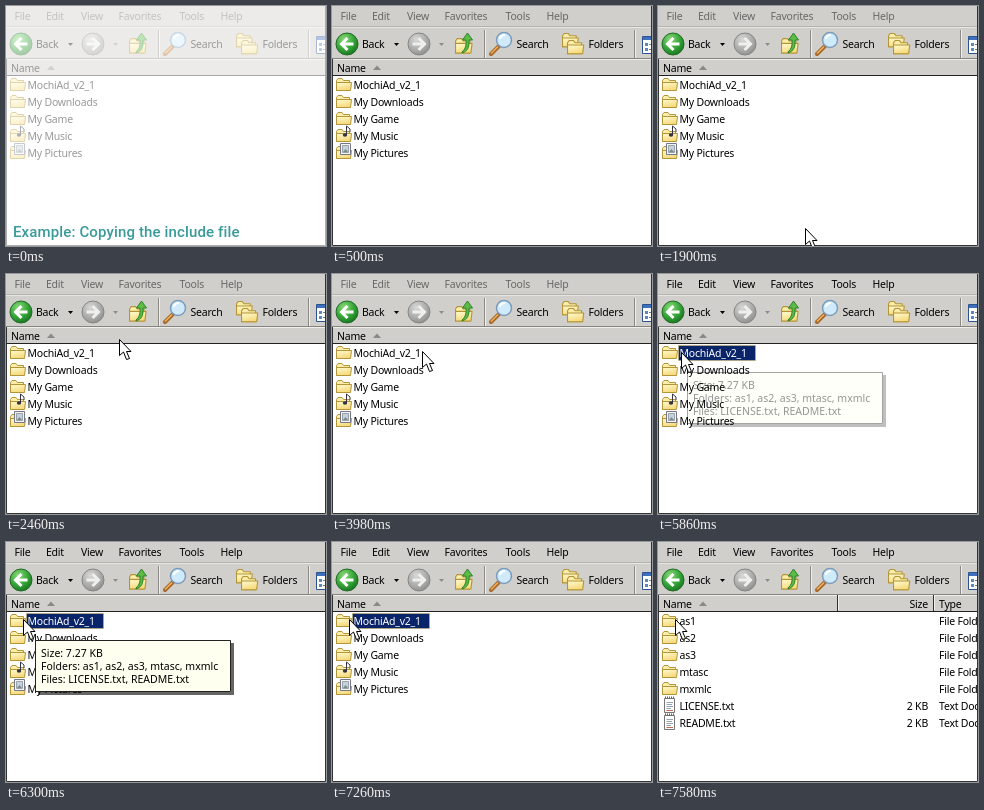
These frames come from a looping animation (320x240 px, 8 s). An HTML page:

```html
<!DOCTYPE html>
<html lang="en">
<head>
<meta charset="utf-8">
<title>File window</title>
<style>
html, body { margin: 0; width: 100%; height: 100%; overflow: hidden; background: #fff; }
svg { display: block; width: 320px; height: 240px; }
text { font: 10.5px "Noto Sans", "DejaVu Sans", sans-serif; letter-spacing: -.22px; white-space: pre; }
#tip text { letter-spacing: 0; }
#caption { font: 500 15px Roboto, sans-serif; letter-spacing: .13px; fill: #399a9a; }
.end { text-anchor: end; }
</style>
</head>
<body>
<svg viewBox="0 0 320 240">
  <defs>
    <linearGradient id="gold" x2=".4" y2="1">
      <stop stop-color="#fffbd2"/><stop offset="1" stop-color="#f6da7c"/>
    </linearGradient>
    <radialGradient id="green" cx=".38" cy=".3" r=".75">
      <stop stop-color="#8edb7c"/><stop offset=".55" stop-color="#38a83a"/><stop offset="1" stop-color="#17731f"/>
    </radialGradient>
    <radialGradient id="grey" cx=".38" cy=".3" r=".75">
      <stop stop-color="#d8d8d6"/><stop offset="1" stop-color="#8f8f8d"/>
    </radialGradient>
    <g id="folder" stroke="#b39437" stroke-linejoin="round">
      <path d="M.5 12.5V2.5L2 .5H6L7.5 2.5H13.5V12.5Z" fill="#fbeeaa"/>
      <path d="M.5 12.5V4.5H15.5L14.5 12.5Z" fill="url(#gold)"/>
    </g>
    <g id="music">
      <use href="#folder"/>
      <path d="M10.5 6V-3L14 0V3" fill="none" stroke="#334"/>
      <ellipse cx="9" cy="6" rx="2.2" ry="1.7" fill="#334"/>
    </g>
    <g id="pictures">
      <use href="#folder"/>
      <path d="M4.5-2.5H14.5V8.5H4.5Z" fill="#f4f4f0" stroke="#778"/>
      <path d="M6.5-.5H12.5V6.5H6.5Z" fill="#c4d2de" stroke="#98a2aa"/>
      <path d="M7 6L9.5 3 12 6Z" fill="#7d8a88"/>
    </g>
    <g id="note">
      <path d="M2.5-.5H12.5V13.5H2.5Z" fill="#fff" stroke="#777"/>
      <path d="M3-1.5H13" stroke="#456a9a" stroke-width="2" stroke-dasharray="1 1"/>
      <path d="M4.5 3.5H11M4.5 5.5H10M4.5 7.5H11M4.5 9.5H9" stroke="#96a4b4"/>
      <path d="M4.5 11.5H11" stroke="#c06a50"/>
    </g>
  </defs>

  <rect width="320" height="240" fill="#fff"/>
  <rect width="320" height="53" fill="#d0cfcb"/>
  <path d="M0 20.5H320" stroke="#b4b3ae"/><path d="M0 21.5H320" stroke="#e6e5e1"/>
  <g id="menu"></g>

  <g id="toolbar">
    <circle cx="15" cy="38" r="11" fill="url(#green)" stroke="#226b28"/>
    <path d="M21.5 38H10M15.5 32L9.5 38 15.5 44" fill="none" stroke="#fff" stroke-width="3"/>
    <path d="M62 37H67L64.5 40Z"/>
    <circle cx="87" cy="38" r="11" fill="url(#grey)" stroke="#858583"/>
    <path d="M80.5 38H92M86.5 32L92.5 38 86.5 44" fill="none" stroke="#efefed" stroke-width="3"/>
    <path d="M107 37H112L109.5 40Z" fill="#8c8c8a"/>
    <use href="#folder" transform="translate(123 32) scale(1.1 1.2)"/>
    <path d="M130 46Q135 42 134 34H130.5L135.5 27 140.5 34H137Q138 45 130 47Z" fill="#5dbb46" stroke="#2a8428"/>
    <path d="M152.5 24V52M302.5 24V52" stroke="#8a8985"/>
    <path d="M153.5 24V52M303.5 24V52" stroke="#f1f0ec"/>
    <path d="M159 48L167 40" stroke="#a8682a" stroke-width="4" stroke-linecap="round"/>
    <path d="M159 47.5L166 40.5" stroke="#eeb45e" stroke-width="1.5"/>
    <circle cx="172" cy="34" r="7.5" fill="#cfeafa" stroke="#7c9cbc" stroke-width="1.5"/>
    <path d="M167.5 33Q169 29 173 29" fill="none" stroke="#fff" stroke-width="2"/>
    <use href="#folder" transform="translate(230 27) scale(1.05 1.1)"/>
    <use href="#folder" transform="translate(235 34) scale(1.08 1.1)"/>
    <path d="M310.5 30.5H321V47.5H310.5Z" fill="#fff" stroke="#2d5290"/>
    <path d="M311 31H320V34H311Z" fill="#3f70bd"/>
    <path d="M313 37H316V40H313ZM313 42H316V45H313Z" fill="#5c88bd"/>
    <path d="M317 38.5H320M317 43.5H320" stroke="#777"/>
  </g>

  <g id="header">
    <rect y="53" width="320" height="16" fill="#d0cfcb"/>
    <path d="M0 52.5H320" stroke="#85847f"/><path d="M0 53.5H320" stroke="#efeeea"/>
    <path d="M0 69.5H320" stroke="#222"/>
    <path d="M41 64H49L45 59.5Z" fill="#8a8985"/>
  </g>
  <g id="columns">
    <path d="M179.5 53V69M275.5 53V69" stroke="#333"/>
    <path d="M180.5 54V68M276.5 54V68" stroke="#f1f0ec"/>
  </g>

  <rect id="selection" x="20.5" y="71.5" width="77" height="15" fill="#0a246a" stroke="#d8b85c" stroke-dasharray="1 1"/>
  <g id="home"></g>
  <g id="inside"></g>
  <rect id="blank" x="1" y="49" width="318" height="190" fill="#fff"/>
  <path d="M.5 53V239.5H319.5V0" fill="none" stroke="#333"/>

  <g id="tip">
    <path d="M225 101H228V153H32V150H225Z" opacity=".6"/>
    <path d="M29.5 98.5H224.5V149.5H29.5Z" fill="#fffff0" stroke="#222"/>
  </g>
  <path id="cursor" d="M.5.5V16.5L4.5 13 7.5 20.5 10.5 19.5 7.5 12.5H12Z" fill="#fff" stroke="#000"/>
  <g id="intro">
    <rect width="320" height="240" fill="#fff" opacity=".6"/>
    <text id="caption" x="7" y="231">Example: Copying the include file</text>
  </g>
</svg>
<script>
const LOOP = 8000, INTRO_END = 500, SELECT = 4220, OPEN = 7420, FILLED = 7580;
const $ = id => document.getElementById(id);

function add(parent, tag, attrs, content = "") {
  const el = document.createElementNS("http://www.w3.org/2000/svg", tag);
  for (const key in attrs) el.setAttribute(key, attrs[key]);
  el.textContent = content;
  return $(parent).appendChild(el);
}
const label = (parent, x, y, content, cls = "") => add(parent, "text", { x, y, class: cls }, content);

function row(parent, i, name, icon = "folder") {
  add(parent, "use", { href: "#" + icon, x: 4, y: 72 + 17 * i });
  return label(parent, 21.5, 83 + 17 * i, name);
}

[["File", 8.5], ["Edit", 40], ["View", 75], ["Favorites", 112.5], ["Tools", 173.5], ["Help", 214.5]]
  .forEach(([name, x]) => label("menu", x, 14, name));
[["Back", 30], ["Search", 184.5], ["Folders", 256.5]].forEach(([name, x]) => label("toolbar", x, 42, name));
label("header", 5, 66, "Name");
label("columns", 270, 66, "Size", "end");
label("columns", 281, 66, "Type");

const chosen = row("home", 0, "MochiAd_v2_1");
["My Downloads", "My Game"].forEach((name, i) => row("home", i + 1, name));
row("home", 3, "My Music", "music");
row("home", 4, "My Pictures", "pictures");

["as1", "as2", "as3", "mtasc", "mxmlc", "LICENSE.txt", "README.txt"].forEach((name, i) => {
  const isFile = i > 4, y = 83 + 17 * i;
  row("inside", i, name, isFile ? "note" : "folder");
  if (isFile) label("inside", 270, y, "2 KB", "end");
  label("inside", 281, y, isFile ? "Text Document" : "File Folder");
});

["Size: 7.27 KB", "Folders: as1, as2, as3, mtasc, mxmlc", "Files: LICENSE.txt, README.txt"]
  .forEach((line, i) => label("tip", 35, 115 + 13 * i, line));

// The pointer jumps between sampled places: time, x, y
const path = [
  [1900, 147, 222], [1980, 156, 160], [2060, 167, 103], [2220, 152, 78], [2300, 137, 67],
  [2460, 113, 65], [2540, 102, 68], [2700, 98, 72], [2860, 94, 75], [2940, 91, 76],
  [3180, 91, 77], [3980, 90, 77], [4940, 88, 77], [5100, 80, 78], [5180, 70, 78],
  [5340, 58, 78], [5420, 49, 78], [5580, 39, 78], [5660, 32, 78], [5820, 16, 77],
  [5860, 23, 78], [5900, 26, 88], [6060, 18, 77], [6220, 17, 78], [6300, 17, 77]
];
const tipFade = [[0, 0], [5820, .2], [5860, .42], [5900, 1], [7260, 0]];

const latest = (steps, t) => steps.findLast(step => step[0] <= t);
const show = (id, on) => $(id).style.display = on ? "" : "none";

function draw(now) {
  const t = now % LOOP, selected = t >= SELECT && t < OPEN, filled = t >= FILLED;
  show("intro", t < INTRO_END);
  show("selection", selected);
  show("home", t < OPEN);
  show("blank", t >= OPEN && !filled);
  show("columns", filled);
  show("inside", filled);
  $("menu").style.fill = t < SELECT ? "#686866" : "#000";
  chosen.style.fill = selected ? "#fff" : "#000";

  // While fading in, the tooltip lets the black labels show through
  const alpha = latest(tipFade, t)[1], tip = $("tip").style;
  tip.opacity = alpha;
  tip.mixBlendMode = alpha < 1 ? "multiply" : "normal";

  const place = latest(path, t);
  show("cursor", place);
  if (place) $("cursor").setAttribute("transform", `translate(${place[1]} ${place[2]})`);
  requestAnimationFrame(draw);
}
draw(performance.now());
</script>
</body>
</html>
```
